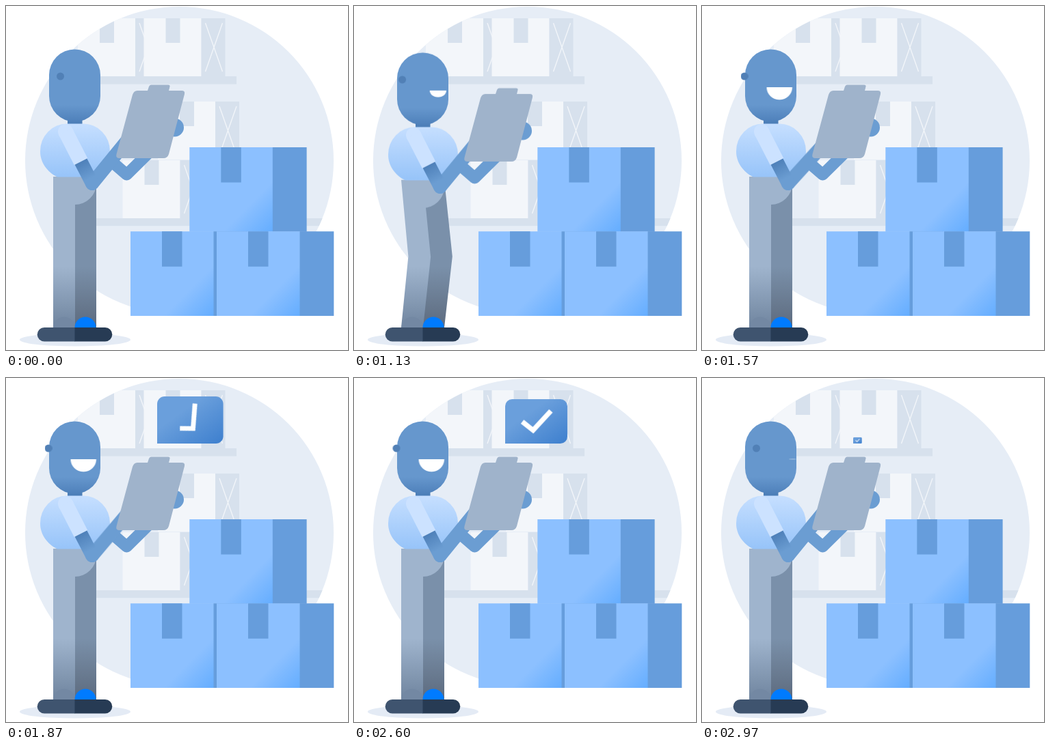
Animation, 500 px wide and 504 px high, one loop 3010 ms. Source, as an HTML page:

```html
<!DOCTYPE html>
<html lang="en">
<head>
<meta charset="utf-8">
<title>Stock check</title>
<style>
  html, body { margin: 0; width: 100%; height: 100%; overflow: hidden; background: #fff; }
  svg { display: block; width: 500px; height: 504px; }

  :root {
    --out: cubic-bezier(.33, .67, .67, 1);
    --in: cubic-bezier(.33, 0, .67, .33);
    --both: cubic-bezier(.65, 0, .35, 1);
  }
  .body, .leg-l, .leg-r, .forearm, .ear, .mouth, .bubble, .check {
    animation: 3010ms linear infinite;
  }
  .body { animation-name: squat; }
  .leg-l { animation-name: leg-l; }
  .leg-r { animation-name: leg-r; }
  .forearm { animation-name: forearm; transform-origin: 126px 260px; }
  .ear { animation-name: ear; }
  .mouth { animation-name: mouth; }
  .bubble { animation-name: bubble; transform-origin: 221px 96px; }
  .check { animation-name: check; transform-origin: 270px 61px; }

  @keyframes squat {
    0%, 34.21% { transform: translateY(0); }
    34.22% { transform: translateY(1.9px); animation-timing-function: var(--out); }
    42.19% { transform: translateY(6px); animation-timing-function: var(--in); }
    50.83%, 100% { transform: translateY(0); }
  }
  @keyframes leg-l {
    0%, 34.21% { d: path("M69 250L101 250L101 367L101 471L69 471L69 367Z"); }
    34.22% {
      d: path("M69 251.9L101 251.9L105 367L101 471L69 471L73 367Z");
      animation-timing-function: var(--out);
    }
    42.19% {
      d: path("M69 256L101 256L115 368L101 471L69 471L82 367Z");
      animation-timing-function: var(--in);
    }
    50.83%, 100% { d: path("M69 250L101 250L101 367L101 471L69 471L69 367Z"); }
  }
  @keyframes leg-r {
    0%, 34.21% { d: path("M100 250L132 250L132 367L132 471L100 471L100 367Z"); }
    34.22% {
      d: path("M100 251.9L132 251.9L136 367L132 471L100 471L104 367Z");
      animation-timing-function: var(--out);
    }
    42.19% {
      d: path("M100 256L132 256L147 367L132 471L100 471L114 368Z");
      animation-timing-function: var(--in);
    }
    50.83%, 100% { d: path("M100 250L132 250L132 367L132 471L100 471L100 367Z"); }
  }
  @keyframes forearm {
    0%, 34.22% { transform: rotate(0); animation-timing-function: ease-in-out; }
    50.83%, 52.16% { transform: rotate(3deg); animation-timing-function: ease-in-out; }
    68.77%, 100% { transform: rotate(0); }
  }
  @keyframes ear {
    0%, 34.22% { transform: translateX(0); animation-timing-function: var(--both); }
    45.5%, 86.38% { transform: translateX(-17.5px); animation-timing-function: var(--both); }
    98.67%, 100% { transform: translateX(0); }
  }
  @keyframes mouth {
    0%, 34.21% { transform: translate(128px, 119px) scale(10, 0); }
    34.22% {
      transform: translate(127.5px, 119px) scale(10.5, .7);
      animation-timing-function: var(--both);
    }
    45.5%, 86.38% {
      transform: translate(94.5px, 119px) scale(37.5, 18.5);
      animation-timing-function: var(--both);
    }
    98.67%, 100% { transform: translate(127.5px, 118.7px) scale(10.5, .7); }
  }
  @keyframes bubble {
    0%, 52.16% { transform: scale(0); animation-timing-function: ease-in-out; }
    63.1%, 86.37% { transform: scale(1); }
    86.38% { transform: scale(.93); }
    98.67%, 100% { transform: scale(.13); }
  }
  @keyframes check {
    0%, 51.66% { transform: rotate(-360deg) scale(0); animation-timing-function: var(--both); }
    68.77%, 100% { transform: rotate(0) scale(1); }
  }
</style>
</head>
<body>
<svg viewBox="0 0 500 504" xmlns="http://www.w3.org/2000/svg">
  <defs>
    <clipPath id="disc"><circle cx="253.5" cy="226.5" r="225.5"/></clipPath>
    <linearGradient id="boxFill" x2="1" y2="1">
      <stop offset=".7" stop-color="#8cc0ff"/><stop offset="1" stop-color="#64adff"/>
    </linearGradient>
    <linearGradient id="bubbleFill" x2="1" y2="1">
      <stop offset=".35" stop-color="#6a9fdc"/><stop offset="1" stop-color="#3d7fce"/>
    </linearGradient>
    <linearGradient id="headFill" gradientUnits="userSpaceOnUse" x1="0" y1="145" x2="0" y2="170">
      <stop stop-color="#6697cd"/><stop offset="1" stop-color="#4e80ba"/>
    </linearGradient>
    <linearGradient id="shirtFill" gradientUnits="userSpaceOnUse" x1="0" y1="172" x2="0" y2="250">
      <stop stop-color="#c6dfff"/><stop offset="1" stop-color="#97c4f9"/>
    </linearGradient>
    <linearGradient id="armFill" gradientUnits="userSpaceOnUse" x1="109" y1="228" x2="122" y2="253">
      <stop stop-color="#4e80b9"/><stop offset="1" stop-color="#6b9dd2"/>
    </linearGradient>
    <linearGradient id="legFill" gradientUnits="userSpaceOnUse" x1="0" y1="382" x2="0" y2="471">
      <stop stop-color="#9fb4cd"/><stop offset="1" stop-color="#70859f"/>
    </linearGradient>
    <linearGradient id="legDark" gradientUnits="userSpaceOnUse" x1="0" y1="382" x2="0" y2="471">
      <stop stop-color="#7a90aa"/><stop offset="1" stop-color="#5d6b7e"/>
    </linearGradient>

    <g id="paleBox">
      <path fill="#f3f6fa" d="M0 0H84V85H0Z"/>
      <path fill="#d7e1ed" d="M32 0H53V36H32ZM84 0H119V85H84Z"/>
      <path stroke="#f3f6fa" stroke-width="1.3" d="M90 7L115 78M115 7L90 78"/>
    </g>
    <g id="blueBox">
      <path fill="url(#boxFill)" d="M0 0H122V123.7H0Z"/>
      <path fill="#669ddc" d="M46 0H75.5V51.5H46ZM121.5 0H171.3V123.7H121.5Z"/>
    </g>
  </defs>

  <g clip-path="url(#disc)">
    <path fill="#e6edf6" d="M0 0H500V504H0Z"/>
    <use href="#paleBox" x="105" y="18"/>
    <use href="#paleBox" x="201.5" y="18"/>
    <use href="#paleBox" x="222" y="140"/>
    <use href="#paleBox" x="170.5" y="226"/>
    <path fill="#d7e1ed" d="M100 103H337V114.5H100ZM100 311H480V322.3H100Z"/>
  </g>

  <use href="#blueBox" x="268.3" y="207"/>
  <use href="#blueBox" x="182" y="330.3"/>
  <use href="#blueBox" x="308" y="330.3"/>

  <ellipse cx="101" cy="489" rx="81" ry="9.5" fill="#e4ebf5"/>
  <path class="leg-r" fill="url(#legDark)" d="M100 250L132 250L132 367L132 471L100 471L100 367Z"/>
  <path class="leg-l" fill="url(#legFill)" d="M69 250L101 250L101 367L101 471L69 471L69 367Z"/>
  <path fill="#7388a3" d="M69.500 471A15.500 15.500 0 0 1 100.500 471Z"/>
  <path fill="#007bff" d="M100.500 471A15.500 15.500 0 0 1 131.500 471Z"/>
  <path fill="#3f546f" d="M101 471H56A10.300 10.300 0 0 0 56 491.600H101Z"/>
  <path fill="#273b54" d="M100.500 471H145A10.300 10.300 0 0 1 145 491.600H100.500Z"/>

  <g class="body">
    <path fill="#9fb4cd" d="M100.500 250H132V260A31 31 0 0 1 100.500 291Z"/>
    <path fill="#4d7fb8" d="M90 158H111.500V175H90Z"/>
    <g fill="none" stroke="#6b9dd2" stroke-width="17" stroke-linejoin="round">
      <path d="M150 224L176.500 247L225 199"/>
    </g>
    <circle cx="246.500" cy="178" r="13.500" fill="#6b9dd2"/>
    <path fill="url(#shirtFill)" d="M89 172.500H113A39 40 0 0 1 152 213C152 230 145 243 135 250.500H75C60 243 50 229 50 213A39 40 0 0 1 89 172.500Z"/>
    <rect x="63" y="63.500" width="75" height="106" rx="37.500" fill="url(#headFill)"/>
    <path class="mouth" fill="#fff" d="M0 0H1C1 .55 .78 1 .5 1S0 .55 0 0Z"/>
    <circle class="ear" cx="79.500" cy="103" r="5.500" fill="#5180b6"/>
    <g fill="none" stroke-width="20" stroke-linecap="round">
      <path class="forearm" stroke="#6b9dd2" d="M126 260L183 190"/>
      <path stroke="url(#armFill)" d="M109.500 228L126 260"/>
      <path stroke="#cce2ff" stroke-width="22" d="M87 184L88 186"/>
      <path stroke="#cce2ff" stroke-width="22" stroke-linecap="butt" d="M87 184L109.500 228"/>
    </g>
    <path fill="#9fb3cb" d="M192 124H207L209 118Q210 115.500 212 115.500H237Q240 115.500 239.500 118L238 124H257Q262 124 261 129L238 217Q236 223 230 223H166Q160 223 161.500 217L185 130Q187 124 192 124Z"/>
  </g>

  <g class="bubble">
    <path fill="url(#bubbleFill)" d="M221 96V37A11 11 0 0 1 232 26H308A11 11 0 0 1 319 37V85A11 11 0 0 1 308 96Z"/>
    <path class="check" fill="none" stroke="#fff" stroke-width="7.700" d="M248 61.500L265 75L293 44.500"/>
  </g>
</svg>
</body>
</html>
```
